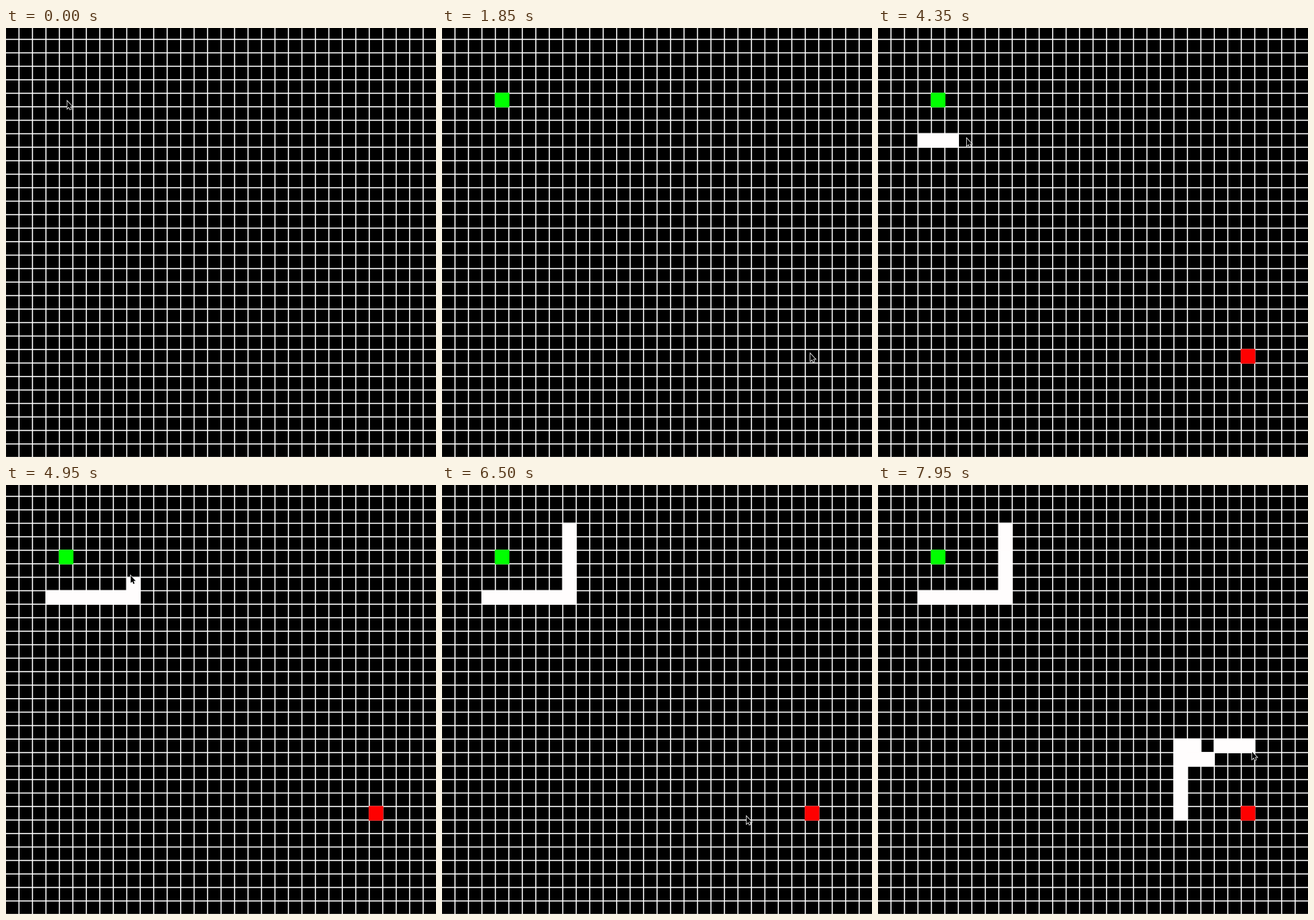
Recreate the animation shown at these times as an HTML page with a canvas. Size 600 px wide and 598 px high, loop 8000 ms.

```html
<!DOCTYPE html>
<html lang="en">
<head>
<meta charset="utf-8">
<title>Grid drawing</title>
<style>
  html, body { margin: 0; width: 100%; height: 100%; overflow: hidden; background: #000; }
  canvas { display: block; }
</style>
</head>
<body>
<canvas id="stage" width="600" height="598"></canvas>
<script>
const ctx = document.getElementById("stage").getContext("2d");
const LOOP = 8000, STEP = 50, LAG = 100;
const PITCH = 18.8, LEFT = 18.1, TOP = 15.8, LINE = 1.5;

// Eased pointer moves between rests
const home = { x: 85.5, y: 102 };
const moves = [
  { from: 800, to: 1050, x: 589, y: 548 },
  { from: 1200, to: 1850, x: 514, y: 454 },
  { from: 2950, to: 3400, x: 92, y: 145 },
  { from: 3400, to: 3800, x: 67, y: 154 },
  { from: 4000, to: 4680, x: 176, y: 154 },
  { from: 4700, to: 5400, x: 169, y: 59 },
  { from: 5800, to: 6500, x: 425, y: 462 },
  { from: 6500, to: 6650, x: 421, y: 464 },
  { from: 6750, to: 7500, x: 423, y: 369 },
  { from: 7550, to: 7690, x: 464, y: 378 },
  { from: 7690, to: 7780, x: 475, y: 368 },
  { from: 7780, to: 7860, x: 522, y: 372 }
];
const presses = [{ from: 3850, to: 5400 }, { from: 6700, to: 7950 }];

function pointerAt(t) {
  let { x, y } = home;
  for (const move of moves) {
    if (t <= move.from) break;
    const u = Math.min(1, (t - move.from) / (move.to - move.from));
    const p = u * u * (3 - 2 * u);
    x += (move.x - x) * p;
    y += (move.y - y) * p;
  }
  return { x, y };
}

// A pressed pointer paints each cell it enters, slightly late.
function traceWalls() {
  const walls = new Map();
  for (const { from, to } of presses) {
    for (let t = from; t < to; t += 10) {
      const { x, y } = pointerAt(t);
      const col = Math.floor((x - LEFT) / PITCH);
      const row = Math.floor((y - TOP) / PITCH);
      const id = col + "," + row;
      if (!walls.has(id)) walls.set(id, { col, row, start: t + LAG, color: "#fffdfd" });
    }
  }
  return [...walls.values()];
}

const cells = [
  { col: 3, row: 4, start: 550, color: "#0f0" },
  { col: 26, row: 23, start: 2600, color: "#f00" },
  ...traceWalls()
];

// Cells cover the lines around them.
function drawCell({ col, row, color }) {
  const size = PITCH + LINE;
  ctx.fillStyle = color;
  ctx.fillRect(LEFT + col * PITCH - LINE / 2, TOP + row * PITCH - LINE / 2, size, size);
}

function drawGrid() {
  ctx.fillStyle = "#fff";
  for (let i = -1; i < 32; i++) {
    ctx.fillRect(LEFT + i * PITCH - LINE / 2, 0, LINE, 598);
    ctx.fillRect(0, TOP + i * PITCH - LINE / 2, 600, LINE);
  }
}

const arrow = new Path2D("M0 0V10.2L2.3 8.1L3.8 11.6L5.5 10.9L4 7.4H7Z");

function drawPointer({ x, y }) {
  ctx.save();
  ctx.translate(x, y);
  ctx.strokeStyle = "#fff";
  ctx.lineWidth = 1.5;
  ctx.stroke(arrow);
  ctx.fillStyle = "#000";
  ctx.fill(arrow);
  ctx.restore();
}

function draw(now) {
  const t = Math.floor((now % LOOP) / STEP) * STEP;
  ctx.fillStyle = "#000";
  ctx.fillRect(0, 0, 600, 598);
  drawGrid();
  cells.filter(cell => t >= cell.start).forEach(drawCell);
  drawPointer(pointerAt(t));
}

const begin = performance.now();
function frame() {
  draw(performance.now() - begin);
  requestAnimationFrame(frame);
}
frame();
</script>
</body>
</html>
```
